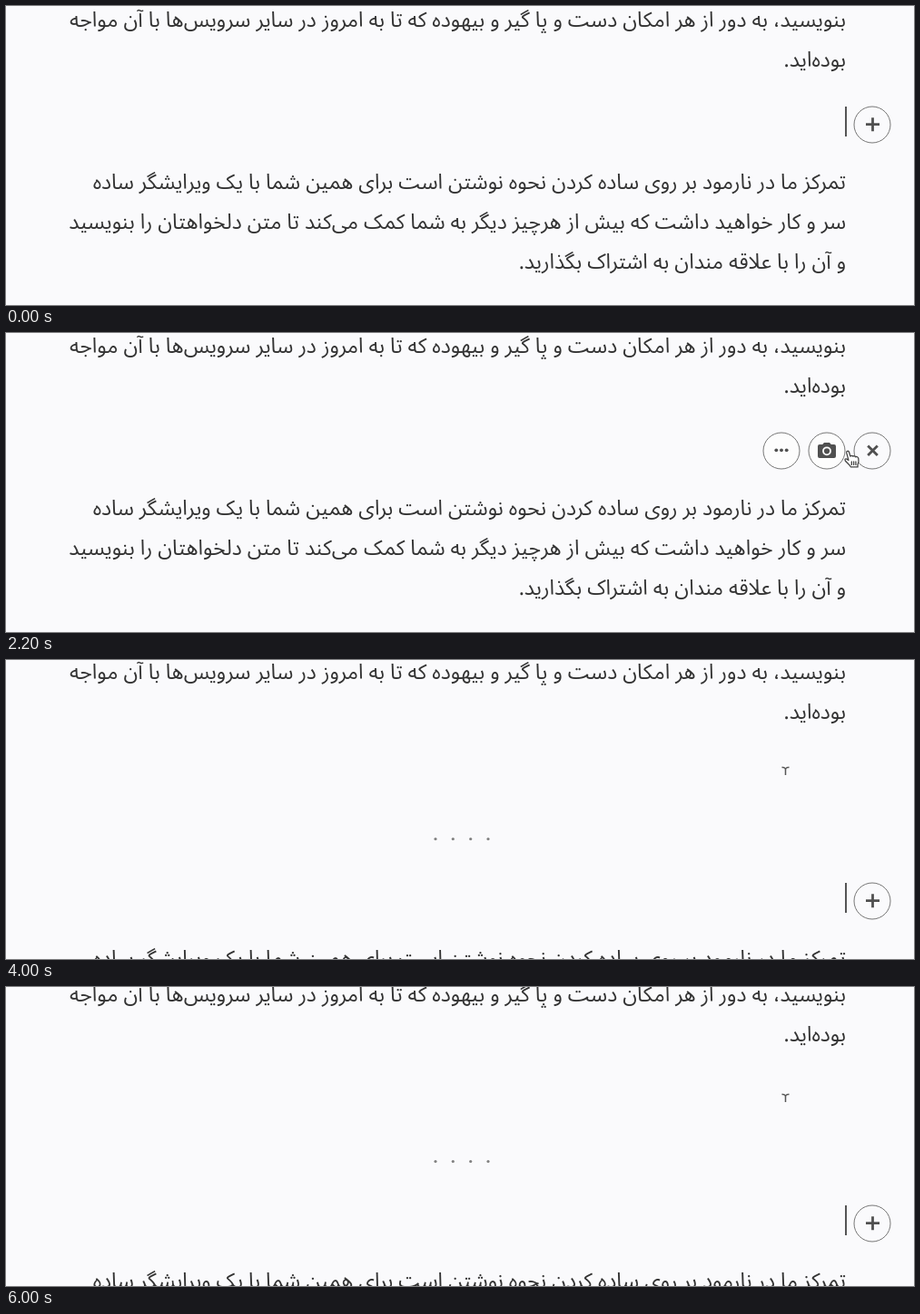
These frames come from a looping animation (1000x330 px, 6.2 s). An HTML page:

```html
<!DOCTYPE html>
<html lang="fa">
<head>
<meta charset="utf-8">
<style>
  html, body { margin: 0; width: 100%; height: 100%; overflow: hidden; background: #fafafc; }
  svg { display: block; }
  text { font: 22px "Noto Sans Arabic", "DejaVu Sans", sans-serif; fill: #333; direction: rtl; }
  .ring { fill: #fdfdfd; stroke: #777; }
  .ink { fill: #505050; }
</style>
</head>
<body>
<svg width="1000" height="330" viewBox="0 0 1000 330">
  <g id="above">
    <text x="925" y="23">بنویسید، به دور از هر امکان دست و پا گیر و بیهوده که تا به امروز در سایر سرویس&zwnj;ها با آن مواجه</text>
    <text x="925" y="67">بوده&zwnj;اید.</text>
  </g>
  <g id="divider" fill="#808080">
    <circle cx="473" cy="192.5" r="1.6"/><circle cx="492.3" cy="192.5" r="1.6"/>
    <circle cx="511.7" cy="192.5" r="1.6"/><circle cx="531" cy="192.5" r="1.6"/>
  </g>
  <g id="below">
    <text x="925" y="202">تمرکز ما در نارمود بر روی ساده کردن نحوه نوشتن است برای همین شما با یک ویرایشگر ساده</text>
    <text x="925" y="246">سر و کار خواهید داشت که بیش از هرچیز دیگر به شما کمک می&zwnj;کند تا متن دلخواهتان را بنویسید</text>
    <text x="925" y="290">و آن را با علاقه مندان به اشتراک بگذارید.</text>
    <g id="menu">
      <g transform="translate(854 131)">
        <circle class="ring" r="20"/>
        <g class="ink"><circle cx="-5.7" cy="-.7" r="1.9"/><circle cy="-.7" r="1.9"/><circle cx="5.7" cy="-.7" r="1.9"/></g>
      </g>
      <g transform="translate(904 131)">
        <circle class="ring" r="20"/>
        <path class="ink" d="M-3-9H3L4.8-7H8Q10-7 10-5V6Q10 8 8 8H-8Q-10 8-10 6V-5Q-10-7-8-7H-4.8Z"/>
        <circle r="4" cy=".3" fill="none" stroke="#fdfdfd" stroke-width="1.8"/>
      </g>
    </g>
    <rect id="caret" x="924" y="111" width="2" height="33" fill="#555"/>
    <g transform="translate(954 131)">
      <circle r="20" fill="none" stroke="#777"/>
      <path id="plus" d="M-7.5 0H7.5M0-7.5V7.5" stroke="#505050" stroke-width="2.8"/>
    </g>
  </g>
  <g id="hand" stroke="#444" stroke-width="1.3" stroke-linejoin="round" stroke-linecap="round">
    <path fill="#fff" d="M5.6 11L3.4 2.8C3 .6 5.6 .2 6.2 2.1L7.6 6.7C8.5 5.5 10 5.8 10.4 6.8C11.4 5.9 12.8 6.4 13.2 7.4C14.6 6.7 16.2 7.4 16.5 9.2C17 12 16.8 14 15.7 16V18.5H8C7.5 16.5 4 14.2 2 11.6C.9 10 2.6 8.7 4.1 10Z"/>
    <path d="M9 12.5V16M11.3 12.5V16M13.6 12.5V16"/>
  </g>
  <path id="beam" d="M854.5 118.5Q858.5 118 858.5 121.5V127M862.5 118.5Q858.5 118 858.5 121.5" fill="none" stroke="#555" stroke-width="1.5"/>
</svg>
<script>
const LOOP = 6200, STEP = 100, INSERT = 4000;
const el = id => document.getElementById(id);
const [above, below, divider, menu, caret, plus, hand, beam] =
  ['above', 'below', 'divider', 'menu', 'caret', 'plus', 'hand', 'beam'].map(el);

// The longest line fills the text column.
const lines = [...document.querySelectorAll('text')];
const size = 22 * 855 / lines[0].getComputedTextLength();
lines.forEach(line => line.style.fontSize = size + 'px');

const ramp = (t, a, b) => Math.min(1, Math.max(0, (t - a) / (b - a)));
const ease = p => p * p * (3 - 2 * p);
const show = (node, on) => node.style.display = on ? '' : 'none';
const move = (node, x, y) => node.setAttribute('transform', `translate(${x} ${y})`);

const handPath = [
  [200, 1003, 92], [900, 949, 130], [1800, 949, 130], [2500, 905, 129],
  [2600, 899, 127], [2800, 899, 127], [2900, 888, 127], [3400, 852, 128]
];
const caretOff = [[400, 900], [1900, 2400], [2900, 3400], [4500, 5000], [5500, 6000]];

function along(path, t) {
  const i = path.findIndex(key => key[0] > t);
  if (i < 0) return path.at(-1).slice(1);
  if (!i) return path[0].slice(1);
  const [t0, x0, y0] = path[i - 1], [t1, x1, y1] = path[i];
  const p = ease(ramp(t, t0, t1));
  return [x0 + (x1 - x0) * p, y0 + (y1 - y0) * p];
}

function draw(t) {
  const inserted = t >= INSERT;
  const nudge = t >= 1200 && t < 3600 ? -1 : 0;
  const scroll = nudge - Math.round(7 * ease(ramp(t, 3900, 4200)));
  move(above, 0, scroll);
  move(below, 0, scroll + (inserted ? 137 : 0));
  move(divider, 0, scroll + 7);
  show(divider, inserted);

  menu.style.opacity = ramp(t, 1400, 2100) * (1 - ramp(t, 3700, INSERT));
  const turn = 45 * (ease(ramp(t, 1200, 1600)) - ease(ramp(t, 3700, INSERT)));
  plus.setAttribute('transform', `translate(.5 -.3) rotate(${turn})`);
  show(caret, !caretOff.some(([a, b]) => t >= a && t < b));

  move(hand, ...along(handPath, t));
  show(hand, t >= 300 && !inserted);
  show(beam, inserted);
}

function tick() {
  draw(Math.floor(performance.now() % LOOP / STEP) * STEP);
  requestAnimationFrame(tick);
}
tick();
</script>
</body>
</html>
```
